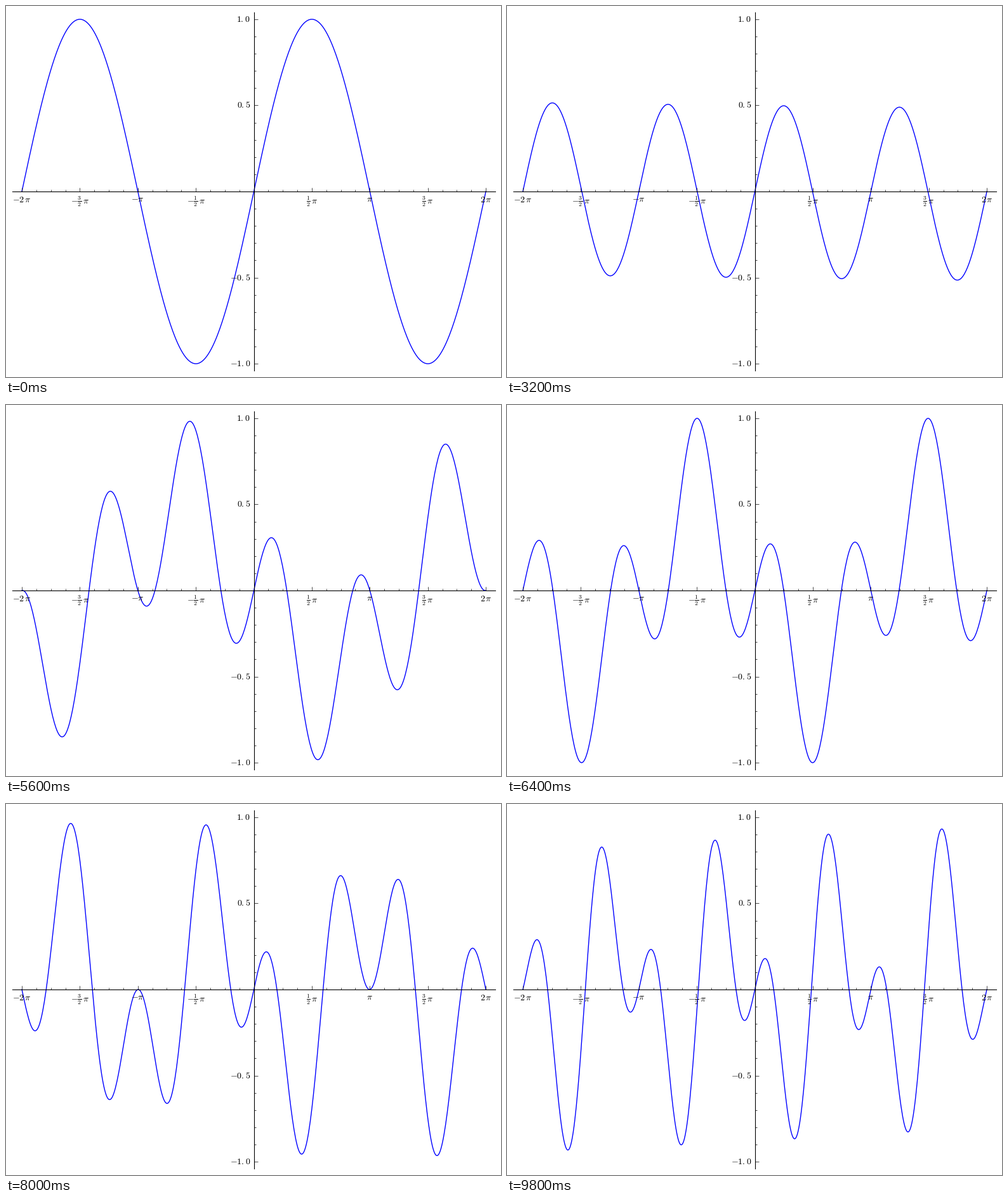
Recreate the animation shown at these times as a matplotlib script. Size 780 by 584 pixels, loop 10000 ms.

```python
import numpy as np
import matplotlib.pyplot as plt
from matplotlib.animation import FuncAnimation
from matplotlib.ticker import FuncFormatter, MultipleLocator

W, H, DPI = 780, 584, 100
FRAMES, INTERVAL = 50, 200
PI = np.pi

# Axes centre and half extents in pixels; the data fill all but a 4 % margin.
CX, CY = 390.55, 292.0
HALF_W, HALF_H = 365.55 * 1.04, 271.1 * 1.04

plt.rcParams["mathtext.fontset"] = "cm"


def pi_label(x, _):
    halves = round(2 * x / PI)
    if halves == 0:
        return ""
    sign = "-" if halves < 0 else ""
    n = abs(halves)
    if n == 2:
        factor = ""
    elif n % 2 == 0:
        factor = rf"{n // 2}\,"
    else:
        factor = rf"\frac{{{n}}}{{2}}\,"
    return rf"${sign}{factor}\pi$"


def decimal_label(y, _):
    if abs(y) < 1e-9:
        return ""
    whole, part = f"{y:.1f}".split(".")
    return f"${whole}.{{{part}}}$"  # braces keep a thin gap after the point


def style_axis(axis, major, minor, label):
    axis.set_major_locator(MultipleLocator(major))
    axis.set_minor_locator(MultipleLocator(minor))
    axis.set_major_formatter(FuncFormatter(label))
    axis.set_tick_params(which="major", direction="in", length=4,
                         width=0.5, pad=4, labelsize=10)
    axis.set_tick_params(which="minor", direction="in", length=2, width=0.5)


fig = plt.figure(figsize=(W / DPI, H / DPI), dpi=DPI, facecolor="white")
ax = fig.add_axes([(CX - HALF_W) / W, (H - CY - HALF_H) / H,
                   2 * HALF_W / W, 2 * HALF_H / H])
ax.set_xlim(-2.08 * PI, 2.08 * PI)
ax.set_ylim(-1.04, 1.04)
ax.set_axisbelow(False)

for side in ("top", "right"):
    ax.spines[side].set_visible(False)
for side in ("left", "bottom"):
    ax.spines[side].set_position(("data", 0))
    ax.spines[side].set_linewidth(0.8)

style_axis(ax.xaxis, PI / 2, PI / 8, pi_label)
style_axis(ax.yaxis, 0.5, 0.1, decimal_label)
for text in ax.get_yticklabels():
    text.set_va("center")

x = np.linspace(-2 * PI, 2 * PI, 601)
curve, = ax.plot(x, np.sin(x), color="blue", linewidth=1)


def update(i):
    curve.set_ydata(np.sin(x) * np.cos(i * PI / FRAMES * x))
    return curve,


anim = FuncAnimation(fig, update, frames=FRAMES, interval=INTERVAL,
                     repeat=True, repeat_delay=0)
plt.show()
```
